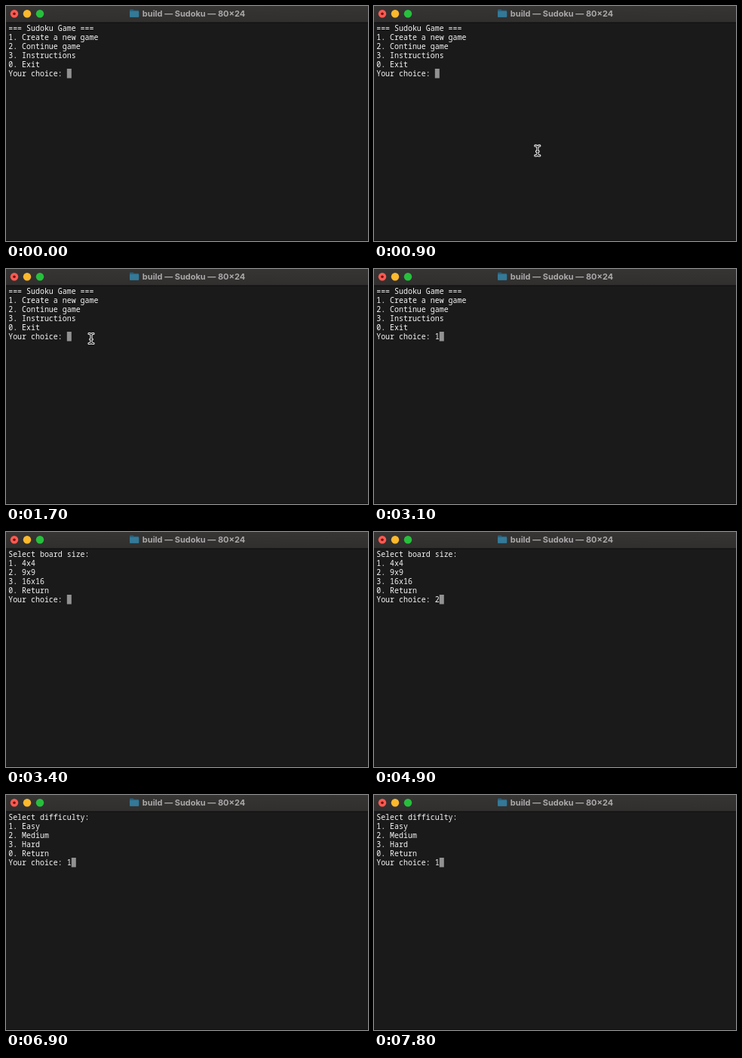
An HTML page that plays this animation: 480x311 px, repeating every 8 s.

```html
<!DOCTYPE html>
<html lang="en">
<head>
<meta charset="utf-8">
<title>Sudoku terminal</title>
<style>
  html, body { margin: 0; width: 100%; height: 100%; overflow: hidden; background: #1a1a1a; }
  svg { display: block; width: 100%; height: 100%; }
  .title { font: 700 11px Inter, "Open Sans", sans-serif; fill: #aaa8a8; text-anchor: middle; }
  #lines { font: 500 9.95px "Noto Sans Mono", "DejaVu Sans Mono", monospace; fill: #f6f6f6; }
  #pointer path { fill: none; stroke-linecap: round; stroke-linejoin: round; }
</style>
</head>
<body>
<svg viewBox="0 0 480 311">
  <defs>
    <linearGradient id="bar" x2="0" y2="1">
      <stop stop-color="#363534"/>
      <stop offset="1" stop-color="#302f2e"/>
    </linearGradient>
    <path id="beam" d="M-3-6.5Q0-6.5 0-4.5Q0-6.5 3-6.5M0-4.5V4.5M-3 6.5Q0 6.5 0 4.5Q0 6.5 3 6.5M-1.3 1H1.3"/>
  </defs>
  <rect width="480" height="311" fill="#1a1a1a"/>
  <rect width="480" height="22" fill="url(#bar)"/>
  <rect y="21.5" width="480" height="1" fill="#0c0c0c"/>
  <rect y="310" width="480" height="1" fill="#101010"/>

  <circle cx="11" cy="10.3" r="5.2" fill="#fb5a52"/>
  <circle cx="11" cy="10.3" r="1.8" fill="#7a0c08"/>
  <circle cx="28" cy="10.3" r="5.2" fill="#fdb92d"/>
  <circle cx="45" cy="10.3" r="5.2" fill="#27c03c"/>

  <path d="M164 5.5q0-1 1-1h3.4l1.3 1.2h5.5q1 0 1 1v7q0 1-1 1h-10.200q-1 0-1-1z" fill="#28617e"/>
  <rect x="164" y="7" width="12.200" height="7.700" rx="1" fill="#347997"/>
  <text class="title" x="249" y="14">build — Sudoku — 80×24</text>

  <rect id="caret" y="83" width="6" height="12.500" fill="#929292"/>
  <g id="lines"></g>
  <g id="pointer">
    <use href="#beam" fill="none" stroke="#f4f4f4" stroke-width="3.200" stroke-linecap="round"/>
    <use href="#beam" fill="none" stroke="#151515" stroke-width="1.100" stroke-linecap="round"/>
  </g>
</svg>
<script>
const LOOP = 8000, STEP = 100, COLUMN = 5.97, LEFT = 3.2;
const $ = id => document.getElementById(id);

// Each menu starts at `from`; its answer is typed at `typed`.
const menus = [
  { from: 0, typed: 2900, key: "1",
    rows: ["=== Sudoku Game ===", "1. Create a new game", "2. Continue game", "3. Instructions", "0. Exit"] },
  { from: 3400, typed: 4900, key: "2",
    rows: ["Select board size:", "1. 4x4", "2. 9x9", "3. 16x16", "0. Return"] },
  { from: 5500, typed: 6900, key: "1",
    rows: ["Select difficulty:", "1. Easy", "2. Medium", "3. Hard", "0. Return"] }
];
const prompt = "Your choice: ";

const rows = Array.from({ length: 6 }, (_, i) => {
  const text = document.createElementNS("http://www.w3.org/2000/svg", "text");
  text.setAttribute("x", LEFT);
  text.setAttribute("y", 33.4 + 12 * i);
  return $("lines").appendChild(text);
});

const progress = (t, a, b) => Math.min(1, Math.max(0, (t - a) / (b - a)));
const smooth = p => p * p * (3 - 2 * p);
const mix = (a, b, p) => a + (b - a) * p;

function pointerAt(t) {
  if (t < 900) return [220.5, mix(208, 195, progress(t, 500, 700))];
  const p = smooth(progress(t, 800, 1700));
  return [mix(220.5, 113, p), mix(195, 92, p)];
}

function draw(t) {
  const menu = menus.findLast(m => t >= m.from);
  const answer = t >= menu.typed ? menu.key : "";
  [...menu.rows, prompt + answer].forEach((line, i) => {
    if (rows[i].textContent !== line) rows[i].textContent = line;
  });
  $("caret").setAttribute("x", LEFT + COLUMN * (prompt.length + answer.length));

  const [x, y] = pointerAt(t);
  $("pointer").setAttribute("transform", `translate(${x} ${y})`);
  $("pointer").setAttribute("visibility", t >= 500 && t < 2900 ? "visible" : "hidden");
}

function frame() {
  const t = performance.now() % LOOP;
  draw(Math.floor(t / STEP) * STEP);
  requestAnimationFrame(frame);
}
frame();
</script>
</body>
</html>
```
